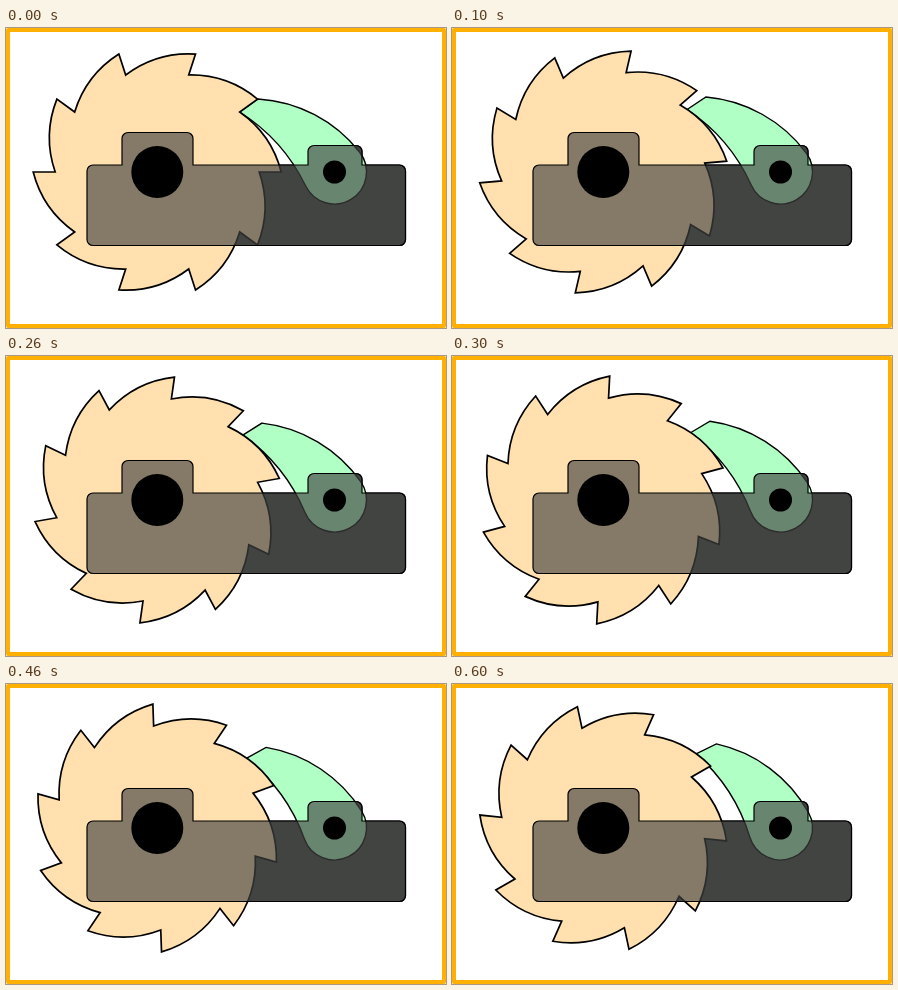
An HTML page for the animation above (0.7 s loop, 440x300 px).

```html
<!DOCTYPE html>
<html lang="en">
<head>
<meta charset="utf-8">
<title>Ratchet and pawl</title>
<style>
  html, body { margin: 0; width: 100%; height: 100%; overflow: hidden; background: #fff; }
  svg { display: block; width: 440px; height: 300px; }
  .plate { fill: #424442; stroke: #000; stroke-width: 1.2; }
  .front { fill-opacity: .65; }
  #gear { fill: #ffe0ae; stroke: #000; stroke-width: 1.7; }
  #pawl { fill: #b0ffc4; stroke: #000; stroke-width: 1.4; }
  .border { fill: none; stroke: #ffb000; stroke-width: 4; stroke-linejoin: round; }
</style>
</head>
<body>
<svg viewBox="0 0 440 300">
  <defs>
    <path id="plate" d="M87 137H116V110.5a6 6 0 0 1 6-6H181a6 6 0 0 1 6 6V137H302V123.5
      a6 6 0 0 1 6-6H350a6 6 0 0 1 6 6V137H393.5a6 6 0 0 1 6 6V211.5a6 6 0 0 1-6 6H87
      a6 6 0 0 1-6-6V143a6 6 0 0 1 6-6Z"/>
  </defs>
  <use href="#plate" class="plate"/>
  <path id="pawl" d="M233.5 84L252 71A140 140 0 0 1 353.7 124.3A32 32 0 1 1 299.7 158A180 180 0 0 0 233.5 84Z"/>
  <path id="gear"/>
  <use href="#plate" class="plate front"/>
  <circle cx="151.3" cy="144" r="26"/>
  <circle cx="328.5" cy="144" r="11.5"/>
  <rect class="border" x="2" y="2" width="436" height="296"/>
</svg>
<script>
  const TEETH = 10, ROOT = 102, TIP = 124, CURVE = 105;
  const STEP_MS = 100, STEPS = 7;
  const gear = document.getElementById('gear');
  const pawl = document.getElementById('pawl');

  function polar(r, i) {
    const a = i * 2 * Math.PI / TEETH;
    return (151.2 + r * Math.cos(a)).toFixed(2) + ' ' + (144 + r * Math.sin(a)).toFixed(2);
  }

  let d = 'M' + polar(ROOT, 0);
  for (let i = 1; i <= TEETH; i++) {
    d += `A${CURVE} ${CURVE} 0 0 1 ${polar(TIP, i)}L${polar(ROOT, i)}`;
  }
  gear.setAttribute('d', d + 'Z');

  // The wheel turns back under the pawl, which lifts until it drops into the next tooth.
  function draw(time) {
    const step = Math.floor(time / STEP_MS) % STEPS;
    gear.setAttribute('transform', `rotate(${-5 * step} 151.2 144)`);
    pawl.setAttribute('transform', `rotate(${1.5 * step} 328.5 144)`);
  }

  const start = performance.now();
  function tick() {
    draw(performance.now() - start);
    requestAnimationFrame(tick);
  }
  draw(0);
  requestAnimationFrame(tick);
</script>
</body>
</html>
```
